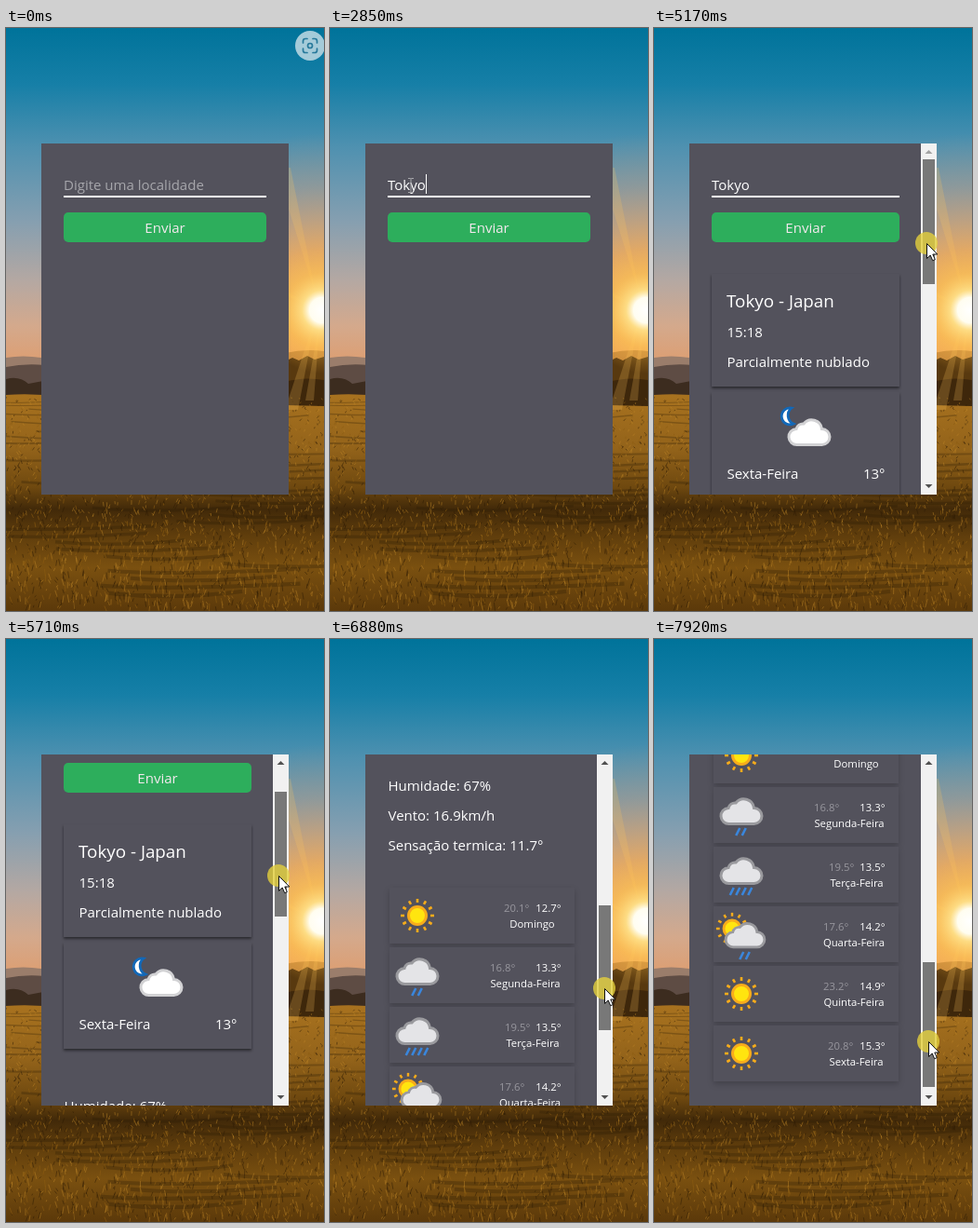
An HTML page that plays this animation: 342x626 px, repeating every 7.99 s.

```html
<!DOCTYPE html>
<html lang="pt">
<head>
<meta charset="utf-8">
<title>Previsão do tempo</title>
<style>
  html, body { margin: 0; width: 100%; height: 100%; overflow: hidden; background: #3a260a; }
  svg { display: block; width: 342px; height: 626px; }
  text { font: 15px "Open Sans", "Noto Sans", sans-serif; fill: #fff; white-space: pre; }
  .title { font-size: 18.8px; }
  .small { font-size: 11.3px; }
  .dim { fill: #98979e; }
  .panel { fill: #53525c; filter: drop-shadow(0 2px 1.5px rgba(0, 0, 0, .5)); }
  .row { fill: #53525c; filter: drop-shadow(0 3px 3px rgba(0, 0, 0, .2)); }
</style>
</head>
<body>
<svg id="stage" viewBox="0 0 342 626"></svg>
<script>
const LOOP = 7990;
const SCROLL_RATIO = 2.818;

// Scenery
let seed = 11;
const random = () => (seed = seed * 16807 % 2147483647) / 2147483647;

const gradient = (id, stops, attrs = 'x2="0" y2="1"', tag = 'linearGradient') =>
  `<${tag} id="${id}" ${attrs}>` + stops.map(([at, color, alpha = 1]) =>
    `<stop offset="${at}" stop-color="${color}" stop-opacity="${alpha}"/>`).join('') + `</${tag}>`;

function wheat(color, count, opacity) {
  let d = '';
  for (let i = 0; i < count; i++) {
    const depth = random();
    const y = 396 + 230 * depth;
    const length = 1.5 + 8 * depth * random();
    const lean = (random() - .5) * 5;
    d += `M${(random() * 342).toFixed(1)} ${y.toFixed(1)}l${lean.toFixed(1)} ${(-length).toFixed(1)}`;
  }
  return `<path d="${d}" fill="none" stroke="${color}" opacity="${opacity}"/>`;
}

function furrows() {
  let out = '';
  for (let i = 0; i < 34; i++) {
    const y = 400 + 215 * (i / 34) ** 1.3;
    const x = random() * 300 - 60;
    out += `<path d="M${x} ${y}q70 ${4 + 4 * random()} ${130 + 90 * random()} -2" fill="none"
      stroke="#2a1a06" stroke-width="${1 + i / 10}" opacity=".28"/>`;
  }
  return out;
}

const scenery = () => `
  <rect width="342" height="400" fill="url(#sky)"/>
  <rect width="342" height="400" fill="url(#glow)"/>
  <path d="M0 354q18 -3 38 0l90 4v40H0z" fill="#9a7d6b"/>
  <path d="M0 364q20 -4 42 -2v34H0z" fill="#5e4c44"/>
  <path d="M0 377q14 -4 24 5l16 -3v18H0z" fill="#3c2c1f"/>
  <path d="M300 349q22 -5 42 -2v14h-42z" fill="#c98a3c"/>
  <path d="M300 358l8 -4 7 3 9 -5 8 4 10 -3v56h-42z" fill="#58390f"/>
  <path d="M300 380q20 -6 42 -2v28h-42z" fill="#3e270b"/>
  <path d="M0 394q30 -2 60 2l240 9 42 1v220H0z" fill="url(#field)"/>
  ${furrows()}
  ${wheat('#2c1b05', 900, .5)}${wheat('#c48a28', 800, .45)}${wheat('#8c5c12', 700, .6)}
  <path d="M334 306L300 410h14zM338 310L322 400h9zM330 300L250 250v14zM334 290L290 150h16z" fill="#ffc25a" opacity=".22"/>
  <rect y="180" width="342" height="240" fill="url(#sun)"/>`;

// Weather icons, each centred on its own origin
function sun(scale = 1) {
  let rays = '';
  for (let i = 0; i < 12; i++) rays += `<path d="M0 -14V-18" transform="rotate(${i * 30})"/>`;
  return `<g transform="scale(${scale})" stroke="#f7ac1b" stroke-width="2.6">${rays}
    <circle r="9.5" fill="#ffe50f" stroke-width="3"/></g>`;
}

const cloud = (fill, stroke) => `<path d="M-13 13.5a8.5 8.5 0 0 1 -1 -17a7.5 7.5 0 0 1 8 -5.5
  a11 11 0 0 1 19.5 5.5a8.5 8.5 0 0 1 0 17z" fill="${fill}" stroke="${stroke}" stroke-width="3"/>`;

const rain = (drops, x = 0) => {
  let d = '';
  for (let i = 0; i < drops; i++) d += `M${x + (i - (drops - 1) / 2) * 6.5 + 1.5} 18l-4 8`;
  return `<path d="${d}" stroke="#3a86dc" stroke-width="2.6"/>`;
};

const greyCloud = cloud('#e4e4e7', '#9a9a9e');
const icons = {
  sun: sun(),
  drizzle: `<g transform="translate(0 -4)">${greyCloud}${rain(2)}</g>`,
  showers: `<g transform="translate(0 -4)">${greyCloud}${rain(4)}</g>`,
  mixed: `<g transform="translate(-10 -6)">${sun(.95)}</g>
    <g transform="translate(4 1)"><g transform="scale(.95)">${greyCloud}</g>${rain(2, 0)}</g>`,
  night: `<path d="M-19 -20a9 9 0 1 0 2 17a10 10 0 0 1 -2 -17z" transform="translate(3 1)"
      fill="#fff" stroke="#1268b8" stroke-width="2.8"/>
    <g transform="translate(3 7)">${cloud('#fff', '#d2d2d4')}</g>`
};

// Page
const label = (x, y, content, attrs = '') => `<text x="${x}" y="${y}" ${attrs}>${content}</text>`;
const icon = (name, x, y) => `<g transform="translate(${x} ${y})">${icons[name]}</g>`;

const days = [
  ['sun', 187, '20.1°', '12.7°', 'Domingo'],
  ['drizzle', 172, '16.8°', '13.3°', 'Segunda-Feira'],
  ['showers', 188, '19.5°', '13.5°', 'Terça-Feira'],
  ['mixed', 182, '17.6°', '14.2°', 'Quarta-Feira'],
  ['sun', 182, '23.2°', '14.9°', 'Quinta-Feira'],
  ['sun', 187, '20.8°', '15.3°', 'Sexta-Feira']
];

const dayRow = ([name, left, low, high, day], i) => `<g transform="translate(0 ${i * 64})">
  <rect class="row" x="64" y="676" width="199" height="60"/>
  ${icon(name, 94, 706)}
  ${label(left, 702, low, 'class="small dim"')}
  ${label(248.5, 702, high, 'class="small" text-anchor="end"')}
  ${label((left + 248) / 2, 719, day, 'class="small" text-anchor="middle"')}</g>`;

const results = () => `
  <rect class="panel" x="62" y="391" width="202" height="114"/>
  <rect class="panel" x="62" y="264" width="202" height="121"/>
  ${label(78, 300, 'Tokyo - Japan', 'class="title"')}
  ${label(78.5, 332, '15:18')}
  ${label(78.5, 364, 'Parcialmente nublado')}
  ${icon('night', 164, 427)}
  ${label(78.5, 484, 'Sexta-Feira')}
  ${label(248.5, 484, '13°', 'text-anchor="end"')}
  ${label(62.5, 572, 'Humidade: 67%')}
  ${label(62.5, 604, 'Vento: 16.9km/h')}
  ${label(62.5, 636, 'Sensação termica: 11.7°')}
  ${days.map(dayRow).join('')}`;

const stage = document.getElementById('stage');
stage.innerHTML = `
  <defs>
    ${gradient('sky', [[0, '#00739a'], [.15, '#167fa7'], [.32, '#4f91b0'], [.52, '#869fb0'], [.68, '#b5a8a2'], [.8, '#d4a98c'], [.89, '#dc9f74']])}
    ${gradient('glow', [[0, '#ffc255', .95], [.35, '#f7aa50', .75], [.7, '#d99a6a', .3], [1, '#d99a6a', 0]],
      'gradientUnits="userSpaceOnUse" cx="340" cy="303" r="190"', 'radialGradient')}
    ${gradient('sun', [[0, '#fff'], [.2, '#fffdf0'], [.32, '#ffe58e', .8], [.6, '#ffc64e', .35], [1, '#ffb640', 0]],
      'gradientUnits="userSpaceOnUse" cx="340" cy="303" r="68"', 'radialGradient')}
    ${gradient('field', [[0, '#a8721f'], [.25, '#93631a'], [.43, '#6e480f'], [.53, '#412909'], [.65, '#5f3d0c'], [.8, '#7a5010'], [1, '#5b390a']])}
    <clipPath id="frame"><rect x="38" y="124" width="266" height="377"/></clipPath>
  </defs>
  ${scenery()}
  <g id="search">
    <circle cx="327" cy="19" r="16" fill="#a5cbd9"/>
    <g fill="none" stroke="#27799b" stroke-width="1.7" stroke-linecap="round">
      <path d="M319.500 16v-2a2.500 2.500 0 0 1 2.500 -2.500h2M330 11.500h2a2.500 2.500 0 0 1 2.500 2.500v2M334.500 22v2a2.500 2.500 0 0 1 -2.500 2.500h-2M324 26.500h-2a2.500 2.500 0 0 1 -2.500 -2.500v-2"/>
      <circle cx="327" cy="19" r="2.500"/>
    </g>
  </g>
  <rect x="38" y="124" width="266" height="377" fill="#53525c"/>
  <g clip-path="url(#frame)">
    <g id="content">
      <text id="field-text" x="62" y="174"></text>
      <rect id="caret" y="157" width="1" height="21" fill="#fff"/>
      <rect id="underline" x="62" y="180" height="2" fill="#fff"/>
      <rect id="button" x="62" y="198" height="32" rx="5"/>
      <text id="send" y="220" text-anchor="middle" style="fill:#f3e9ee">Enviar</text>
      <g id="results">${results()}</g>
    </g>
    <g id="scrollbar">
      <rect x="287" y="124" width="17" height="377" fill="#f1f1f1"/>
      <path id="arrow-up" d="M291.500 135h8l-4 -4z"/>
      <path d="M291.500 490h8l-4 4z" fill="#505050"/>
      <rect id="thumb" x="289" width="13" height="134"/>
    </g>
  </g>
  <circle id="press" r="12" fill="#e3d03c" opacity=".8"/>
  <path id="arrow" d="M.5 .5v16l3.700 -3.500 2.500 5.700 2.600 -1.100 -2.500 -5.600h5z" fill="#fff" stroke="#111"/>
  <path id="beam" d="M-3 -7.500h2.500l.5 .5 .5 -.5h2.500M0 -7v14M-3 7.500h2.500l.5 -.5 .5 .5h2.500" fill="none" stroke="#a9a9ad"/>`;

const el = {};
stage.querySelectorAll('[id]').forEach(node => el[node.id] = node);

// Motion
const pointerPath = [
  [170, 210, 564], [380, 74, 207], [640, 74, 207], [1060, 87, 169], [3380, 87, 169],
  [3600, 200, 212], [4150, 205, 212], [4290, 245, 263], [4840, 293, 231], [5430, 293, 231],
  [5710, 293, 254], [6330, 295, 340], [6880, 295, 375], [7920, 295, 432]
];
const thumbPath = [[5430, 0], [5710, 23], [6330, 108], [6880, 145], [7920, 206]];
const keystrokes = [1860, 2190, 2520, 2650, 2850];

function along(path, t) {
  const next = path.findIndex(point => point[0] > t);
  if (next === 0) return path[0].slice(1);
  if (next < 0) return path[path.length - 1].slice(1);
  const a = path[next - 1], b = path[next];
  const p = (t - a[0]) / (b[0] - a[0]);
  return a.slice(1).map((v, i) => v + (b[i + 1] - v) * p);
}

const between = (t, from, to) => t >= from && t < to;
const show = (node, visible) => node.setAttribute('visibility', visible ? 'visible' : 'hidden');
const set = (node, attrs) => Object.entries(attrs).forEach(([key, value]) => node.setAttribute(key, value));

// The screen refreshes in short even steps.
const snap = t => t < 5500
  ? 3380 + Math.floor((t - 3380) / 70) * 70
  : 5500 + Math.floor((t - 5500) / 69) * 69;

function render(t) {
  const step = snap(t);
  const loaded = t >= 3870;
  const width = loaded ? 202 : 218;
  const dragging = t >= 5170;

  const typed = 'Tokyo'.slice(0, keystrokes.filter(k => t >= k).length);
  el['field-text'].textContent = typed || 'Digite uma localidade';
  el['field-text'].style.fill = typed ? '#fff' : '#a6a6ab';
  const caretX = typed ? 62 + Math.round(el['field-text'].getComputedTextLength()) : 62;
  set(el.caret, { x: caretX });
  show(el.caret, between(t, 1160, 1660) || between(t, 1860, 3380));

  const hovered = between(t, 380, 780) || between(t, 3600, 4220);
  set(el.underline, { width });
  set(el.button, { width, fill: hovered ? '#2aa758' : '#2dae5c' });
  set(el.send, { x: 62 + width / 2 });

  const [offset] = along(thumbPath, step).map(Math.round);
  set(el.content, { transform: `translate(0 ${-Math.round(offset * SCROLL_RATIO)})` });
  set(el.thumb, { y: 141 + offset, fill: dragging ? '#787878' : t >= 4770 ? '#a8a8a8' : '#c1c1c1' });
  set(el['arrow-up'], { fill: offset ? '#505050' : '#a3a3a3' });
  show(el.results, loaded);
  show(el.scrollbar, loaded);

  const [x, y] = along(pointerPath, step).map(Math.round);
  const place = { transform: `translate(${x} ${y})` };
  const overField = between(t, 860, 3450);
  [el.arrow, el.beam, el.press].forEach(node => set(node, place));
  show(el.arrow, t >= 170 && !overField);
  show(el.beam, overField);
  show(el.press, dragging || between(t, 1060, 1190) || between(t, 3600, 3740));

  el.search.style.opacity = Math.max(0, Math.min(1, 1 - (step - 570) / 210));
}

const start = performance.now();
function tick() {
  render((performance.now() - start) % LOOP);
  requestAnimationFrame(tick);
}
tick();
</script>
</body>
</html>
```
